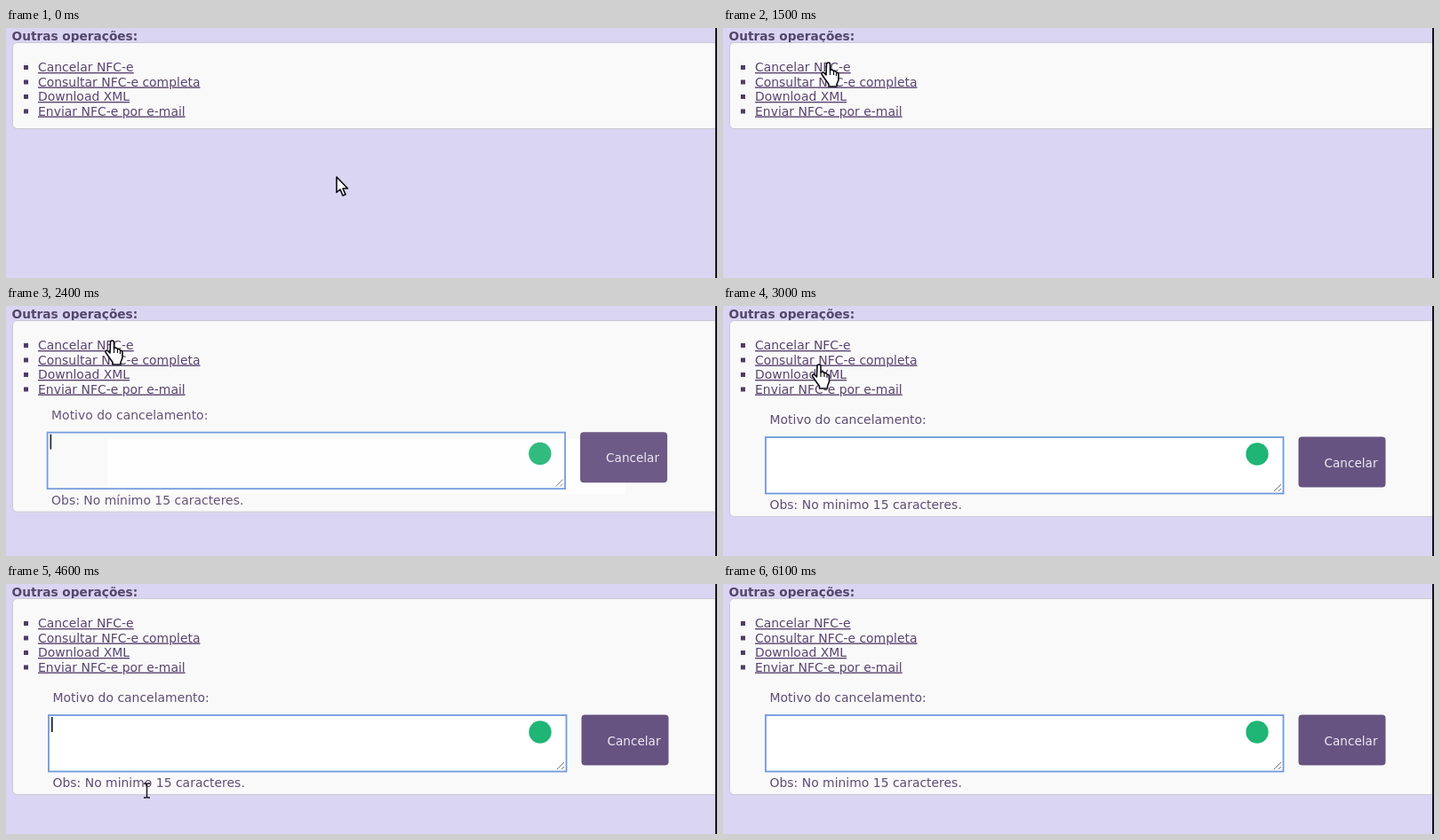
Recreate the animation shown at these times as an HTML page. Size 800 by 282 pixels, loop 6.5 s.

```html
<!DOCTYPE html>
<html lang="pt-BR">
<head>
<meta charset="utf-8">
<title>Outras operações</title>
<style>
  html, body { margin: 0; width: 100%; height: 100%; overflow: hidden; background: #d9d5f2; }
  svg { display: block; width: 100vw; height: 100vh; }
  text { font: 13.95px "DejaVu Sans", Verdana, sans-serif; fill: #5d4d73; white-space: pre; }
  .title { font-size: 13.7px; font-weight: bold; fill: #54466b; }
  .link { fill: #5a4570; text-decoration: underline; }
  .button { font-size: 13.6px; fill: #efeaf5; }
  .bullet { fill: #4d3d63; }
  .pointer { fill: #fff; stroke: #0b0b12; stroke-width: 1.6; stroke-linejoin: round; }
</style>
</head>
<body>
<svg viewBox="0 0 800 282">
  <clipPath id="below"><rect y="108" width="800" height="174"/></clipPath>
  <rect width="800" height="282" fill="#d9d5f2"/>
  <text class="title" x="6.500" y="14">Outras operações:</text>
  <rect id="panel" x="7.500" y="16.500" width="810" height="97" rx="5" fill="#f9f9f9" stroke="#cbc9d2"/>
  <g id="links"></g>

  <g clip-path="url(#below)">
    <g id="form">
      <text x="52.500" y="133">Motivo do cancelamento:</text>
      <text id="note" x="52.500" y="229"></text>
      <rect id="sheet" x="116" width="582" height="62" fill="#fff"/>
      <rect id="field" x="48" y="148" width="582.500" height="63.500" fill="#fff" stroke="#7099dc" stroke-width="1.800"/>
      <path d="M620 209l8-8M625 209l3-3" stroke="#777" fill="none"/>
      <rect id="caret" x="51" y="150" width="1.600" height="17" fill="#15121c"/>
      <rect x="647.500" y="147.500" width="98" height="57" rx="4" fill="#675381"/>
      <text class="button" x="676.500" y="181.500">Cancelar</text>
    </g>
  </g>
  <circle id="badge" cx="601" cy="167" r="12.700" fill="#1fb574"/>

  <g id="cursor">
    <path id="arrow" class="pointer" d="M0 0V17.500L4 14L7 21L10 19.700L7 13H12.500Z"/>
    <g id="hand" class="pointer">
      <path d="M-2 2a2 2 0 0 1 4 0v7l1-1q2 0 3 1.500q2-.5 3 1.500q2.500 0 2.500 2.500v6l-2 5v2.500h-9v-2.500l-5-7q-2-3-3-4.500q0-2 2-2l3 3z"/>
      <path d="M2 9v5M6 10v4M9 11.500v3.500" stroke-width="1.200"/>
    </g>
    <path id="beam" d="M-3.500-8H-1L0-7L1-8H3.500M0-7V7M-3.500 8H-1L0 7L1 8H3.500" fill="none" stroke="#1c1824" stroke-width="1.500"/>
  </g>
  <rect x="798" width="2" height="282" fill="#15121c"/>
</svg>
<script>
  const LOOP = 6500, STEP = 100, LAST = 6100;
  const OPEN = 1880, OPEN_TIME = 600, GROWTH = 124;
  const BLINK_START = 2000, BLINK = 530;
  const el = id => document.getElementById(id);
  const set = (id, attrs) => {
    for (const key in attrs) el(id).setAttribute(key, attrs[key]);
  };
  const show = (id, on) => el(id).setAttribute('visibility', on ? 'visible' : 'hidden');

  // time, hotspot x, hotspot y, pointer shape
  const path = [
    [100, 372, 168, 'arrow'], [200, 364, 163, 'arrow'], [400, 270, 118, 'arrow'],
    [600, 165, 66, 'arrow'], [700, 140, 53, 'arrow'], [800, 126, 45, 'hand'],
    [1100, 121, 41, 'hand'], [1500, 118.5, 39, 'hand'], [2200, 119.5, 39, 'hand'],
    [2700, 119.5, 39, 'hand'], [3000, 108, 66, 'hand'], [3200, 99, 97, 'hand'],
    [3300, 92, 120, 'arrow'], [3400, 85, 149, 'beam'], [3800, 75.5, 164, 'beam'],
    [4200, 92, 187, 'beam'], [4600, 158.5, 233, 'beam'], [4700, 162, 236, 'arrow'],
    [4900, 165, 237, 'arrow'], [5600, 170, 244, 'arrow'], [5900, 177, 267, 'arrow'],
    [6100, 180, 290, 'arrow']
  ];

  ['Cancelar NFC-e', 'Consultar NFC-e completa', 'Download XML', 'Enviar NFC-e por e-mail']
    .forEach((label, i) => {
      const y = 49 + i * 16.5;
      el('links').insertAdjacentHTML('beforeend',
        `<rect class="bullet" x="20" y="${y - 7}" width="5" height="5"/>
         <text class="link" x="36" y="${y}">${label}</text>`);
    });

  function drawCursor(t) {
    let i = 0;
    while (i < path.length - 2 && t >= path[i + 1][0]) i++;
    const a = path[i], b = path[i + 1];
    const k = Math.min(1, Math.max(0, (t - a[0]) / (b[0] - a[0])));
    const x = a[1] + (b[1] - a[1]) * k;
    const y = a[2] + (b[2] - a[2]) * k;
    set('cursor', { transform: `translate(${x} ${y})` });
    for (const shape of ['arrow', 'hand', 'beam']) show(shape, shape === a[3]);
  }

  function drawForm(t) {
    const k = Math.min(1, Math.max(0, (t - OPEN) / OPEN_TIME));
    const p = 0.5 - Math.cos(Math.PI * k) / 2;
    const rest = 1 - p, done = k === 1;
    const dy = -GROWTH * rest;
    const lag = Math.max(0, 0.96 - p) / 0.41;

    set('panel', { height: 97 + GROWTH * p });
    set('form', { transform: `translate(${-33 * rest} ${dy})`, opacity: p });
    set('field', { fill: done ? '#fff' : 'none' });
    set('sheet', { y: 150 - dy });
    show('sheet', !done);
    set('badge', { transform: `translate(${-24 * lag} ${-62 * lag})`, opacity: done ? 1 : p * p });
    el('note').textContent = `Obs: No m${done ? 'i' : 'í'}nimo 15 caracteres.`;

    const beat = Math.floor((t - BLINK_START) / BLINK);
    show('caret', t >= BLINK_START && beat % 2 === 0);
  }

  const start = performance.now();
  function frame() {
    const now = Math.max(0, performance.now() - start) % LOOP;
    const t = Math.min(LAST, Math.floor(now / STEP) * STEP);
    drawCursor(t);
    drawForm(t);
    requestAnimationFrame(frame);
  }
  frame();
</script>
</body>
</html>
```
